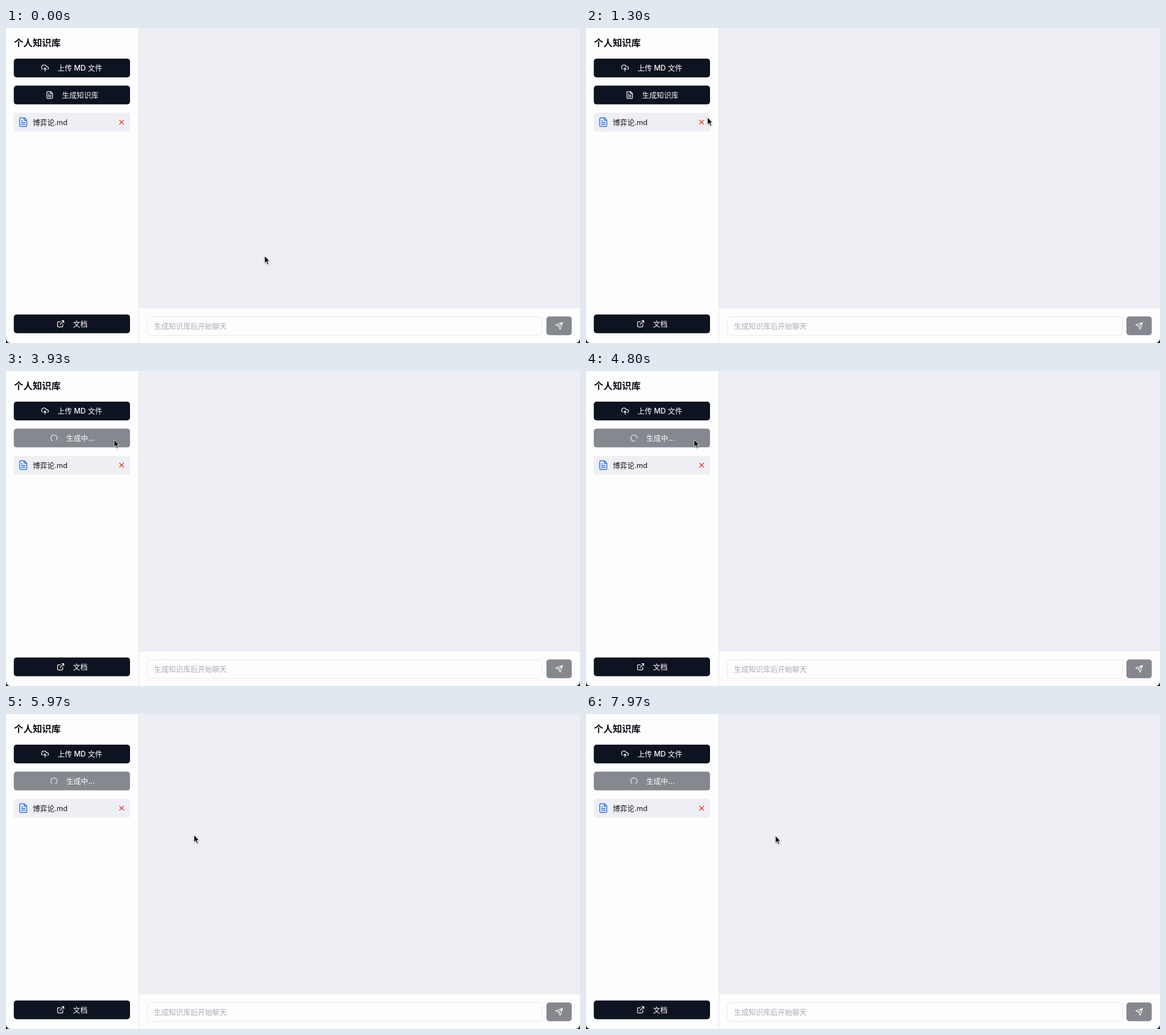
These frames come from a looping animation (1009 by 555 pixels, 8 s). An HTML page:

```html
<!DOCTYPE html>
<html lang="zh-CN">
<head>
<meta charset="utf-8">
<title>个人知识库</title>
<style>
  html, body { margin: 0; width: 100%; height: 100%; overflow: hidden; background: #fdfdfd; }
  svg { display: block; }
  text { font: 500 12.8px Inter, "Noto Sans CJK SC", "Noto Sans CJK", sans-serif; fill: #fdfdfd; }
  .title { font-size: 16.45px; font-weight: 600; fill: #0a0d16; }
  .file { font-weight: 400; fill: #14171f; }
  .hint { font-weight: 400; fill: #a8acb7; }
  .icon { fill: none; stroke: #fdfdfd; stroke-width: 2; stroke-linecap: round; stroke-linejoin: round; }
  .btn { fill: #0d1320; }
  .off { fill: #85888e; }
  .line { fill: #e1e4e9; }
</style>
</head>
<body>
<svg width="1009" height="555" viewBox="0 0 1009 555">
  <defs>
    <symbol id="upload" viewBox="0 0 24 24">
      <path d="M4 14.9A7 7 0 1 1 15.71 8h1.79a4.5 4.5 0 0 1 2.5 8.24M12 12v9M16 16l-4-4-4 4"/>
    </symbol>
    <symbol id="doc" viewBox="0 0 24 24">
      <path d="M15 2H6a2 2 0 0 0-2 2v16a2 2 0 0 0 2 2h12a2 2 0 0 0 2-2V7ZM14 2v4a2 2 0 0 0 2 2h4M10 9H8M16 13H8M16 17H8"/>
    </symbol>
    <symbol id="link" viewBox="0 0 24 24">
      <path d="M15 3h6v6M10 14 21 3M18 13v6a2 2 0 0 1-2 2H5a2 2 0 0 1-2-2V8a2 2 0 0 1 2-2h6"/>
    </symbol>
    <symbol id="cross" viewBox="0 0 24 24"><path d="M18 6 6 18M6 6l12 12"/></symbol>
    <symbol id="send" viewBox="0 0 24 24"><path d="m22 2-7 20-4-9-9-4ZM22 2 11 13"/></symbol>
    <filter id="soft" x="-60%" y="-40%" width="220%" height="200%">
      <feDropShadow dx="0" dy="1" stdDeviation="1" flood-opacity=".35"/>
    </filter>
  </defs>

  <rect width="1009" height="555" fill="#fdfdfd"/>
  <rect x="234" width="775" height="492.5" fill="#eeeff4"/>
  <rect class="line" x="233" width="1" height="555"/>
  <rect class="line" x="234" y="492.5" width="775" height="1"/>

  <text class="title" x="14" y="32.3">个人知识库</text>

  <rect class="btn" x="13.7" y="54" width="204.3" height="33" rx="5"/>
  <use class="icon" href="#upload" x="61.3" y="63.2" width="14.6" height="14.6"/>
  <text x="90.4" y="75.3">上传 MD 文件</text>

  <g id="ready">
    <rect class="btn" x="13.7" y="101.6" width="204.3" height="33" rx="5"/>
    <use class="icon" href="#doc" x="69.5" y="110.8" width="14.6" height="14.6"/>
    <text x="98.5" y="122.9">生成知识库</text>
  </g>
  <g id="busy">
    <rect class="off" x="13.7" y="101.6" width="204.3" height="33" rx="5"/>
    <g transform="translate(84.3 118.1) scale(.61)">
      <path id="spinner" class="icon" stroke-opacity=".85" d="M9 0A9 9 0 1 1 2.781-8.56"/>
    </g>
    <text x="106" y="122.9">生成中...</text>
  </g>

  <rect x="13.7" y="149.5" width="204.3" height="33" rx="3.5" fill="#eeeff4"/>
  <use class="icon" style="stroke:#2f71dd" href="#doc" x="21.2" y="156.7" width="18.3" height="18.3"/>
  <text class="file" x="47" y="170.5">博弈论.md</text>
  <use class="icon" style="stroke:#d8322f" href="#cross" x="195.9" y="158.6" width="14.6" height="14.6"/>

  <rect class="btn" x="13.7" y="504.8" width="204.3" height="33" rx="5"/>
  <use class="icon" href="#link" x="88.8" y="513.9" width="14.6" height="14.6"/>
  <text x="117.8" y="526">文档</text>

  <rect x="248.5" y="508.5" width="694" height="33" rx="5" fill="#fdfdfd" stroke="#e5e8ec"/>
  <text class="hint" x="260.2" y="529.7">生成知识库后开始聊天</text>
  <rect class="off" x="950" y="508.3" width="44.5" height="33" rx="5"/>
  <use class="icon" href="#send" x="965" y="517.5" width="14.6" height="14.6"/>

  <path d="M0 547A8 8 0 0 0 8 555H0Z" fill="#34131b"/>
  <path d="M1009 547A8 8 0 0 1 1001 555H1009Z" fill="#15161a"/>

  <path id="cursor" filter="url(#soft)" stroke="#fff" stroke-width=".9" stroke-linejoin="round"
    d="M.5.5V13.4L3.4 10.7 5.5 15.6 7.7 14.7 5.6 9.9H9.5Z"/>
</svg>
<script>
  const LOOP = 8000, BUSY_AT = 2370, SPIN_ZERO = 2600;
  const byId = id => document.getElementById(id);
  const [ready, busy, spinner, cursor] = ['ready', 'busy', 'spinner', 'cursor'].map(byId);

  const hold = () => 0;
  const both = p => p * p * (3 - 2 * p);
  const rise = p => p ** 1.5;
  const settle = p => 1 - (1 - p) ** 1.8;

  // time, x, y, easing towards the next stop
  const stops = [
    [0, 454, 401, hold], [30, 454, 401, both],
    [670, 289.5, 273, hold], [870, 289.5, 273, both],
    [1500, 189.5, 121, hold], [1670, 189.5, 121, both],
    [1800, 189.5, 120, hold], [3330, 189.5, 120.5, hold],
    [5100, 189.5, 120.5, rise], [5470, 242.5, 160, settle],
    [6050, 332.5, 214, hold], [LOOP, 332.5, 214, hold]
  ];

  function cursorAt(t) {
    const i = stops.findIndex(s => s[0] > t);
    const [t0, x0, y0, ease] = stops[i - 1], [t1, x1, y1] = stops[i];
    const p = ease((t - t0) / (t1 - t0));
    return [x0 + (x1 - x0) * p, y0 + (y1 - y0) * p];
  }

  // The spinner stalls twice before it turns freely.
  function spinAt(t) {
    const shown = t < 2970 ? SPIN_ZERO : t < 3330 ? 3000 : t;
    return (shown - SPIN_ZERO) * 0.36 % 360;
  }

  function draw(now) {
    const t = now % LOOP, loading = t >= BUSY_AT;
    ready.style.display = loading ? 'none' : '';
    busy.style.display = loading ? '' : 'none';
    spinner.setAttribute('transform', `rotate(${spinAt(t)})`);
    cursor.setAttribute('transform', `translate(${cursorAt(t)})`);
  }

  const start = performance.now();
  function tick() {
    draw(performance.now() - start);
    requestAnimationFrame(tick);
  }
  tick();
</script>
</body>
</html>
```
